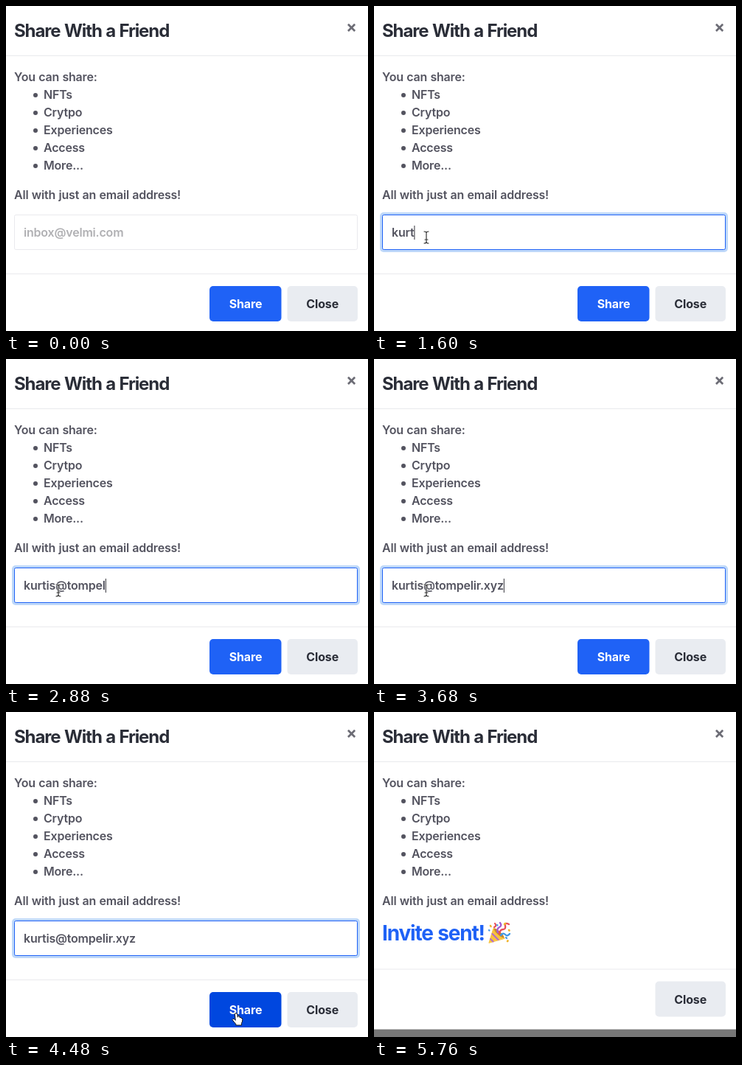
Write an HTML page that moves like this. It is 491 px wide and 441 px high and loops after 6.08 s.

```html
<!DOCTYPE html>
<html lang="en">
<head>
<meta charset="utf-8">
<title>Share dialog</title>
<style>
  html, body { margin: 0; width: 100%; height: 100%; overflow: hidden; background: #fff; }
  svg { display: block; width: 100%; height: 100%; }
  text {
    font: 600 16px Inter, "Liberation Sans", sans-serif;
    font-optical-sizing: none;
    letter-spacing: -0.0125em;
    word-spacing: 0.035em;
    fill: #53535f;
  }
  .title { font-size: 24px; font-weight: 700; letter-spacing: -0.046em; fill: #2a2d37; }
  .sent { font-size: 28px; font-weight: 700; letter-spacing: -0.042em; fill: #1f62f6; }
  .button { font-weight: 700; letter-spacing: -0.01em; text-anchor: middle; fill: #2a2d37; }
  .light { fill: #fff; }
  .hint { fill: #b0b0b3; }
  .rule { fill: #e9eaed; }
</style>
</head>
<body>
<svg viewBox="0 0 491 441">
  <rect width="491" height="441" fill="#fff"/>
  <text class="title" x="11" y="42">Share With a Friend</text>
  <path d="M464 24.8l9.2 9.2m0-9.2l-9.2 9.2" stroke="#6c6c75" stroke-width="2.7"/>
  <rect class="rule" y="67" width="491" height="1"/>
  <text x="11" y="102">You can share:</text>
  <g id="list"></g>
  <text x="11" y="262">All with just an email address!</text>

  <g id="form">
    <rect id="glow" x="8" y="280" width="472" height="54" rx="5" fill="#bed8f9"/>
    <rect id="field" x="11.5" y="283.5" width="465" height="47" rx="2" fill="#fff"/>
    <text id="hint" class="hint" x="24" y="313">inbox@velmi.com</text>
    <text id="typed" x="24" y="313"></text>
    <rect id="caret" y="298" width="1" height="19" fill="#33333a"/>
  </g>

  <g id="done">
    <text class="sent" x="11" y="310">Invite sent!</text>
    <g fill="none" stroke-linecap="round">
      <path d="M156 313L162 293.5Q172 297 177 307Z" fill="#f8c33c" stroke="#f8c33c" stroke-linejoin="round"/>
      <path d="M160.5 301l8 8M158 308l3.5 3.5" stroke="#b06ad0" stroke-width="2"/>
      <ellipse cx="169.5" cy="300" rx="2.4" ry="9" transform="rotate(-47 169.5 300)" fill="#c98a2c"/>
      <path d="M168 299q-2-5 2-7t1-6" stroke="#a65bd3" stroke-width="2.3"/>
      <path d="M170 301q1-6 5-6t3-5 5-2" stroke="#e8505b" stroke-width="2.4"/>
      <path d="M172 303q3-4 6-1t6-1" stroke="#3f97e6" stroke-width="2.3"/>
      <path d="M163 292q4-2 1-5" stroke="#e8505b" stroke-width="2.2"/>
      <path d="M177 288l1-1M158 290l.5 1M183 296l.5.5M181 311l.5-.5" stroke="#f0b52f" stroke-width="2.6"/>
      <path d="M179 306l1 1M167 289l.4.4M156 296l.4.4" stroke="#4a9be8" stroke-width="2.4"/>
    </g>
  </g>

  <g id="footer">
    <rect class="rule" y="363" width="491" height="1"/>
    <g id="share">
      <rect id="shareBox" x="276" y="380" width="97.5" height="48" rx="5"/>
      <text class="button light" x="325" y="410">Share</text>
    </g>
    <rect x="381.5" y="380" width="95.5" height="48" rx="5" fill="#e9ecf1"/>
    <text class="button" x="429.2" y="410">Close</text>
  </g>
  <rect id="backdrop" y="430.6" width="491" height="10.4" fill="#777"/>

  <g id="beam" fill="none" stroke-linecap="round">
    <path d="M-3-8q3 0 3 2v12q0 2-3 2M3-8q-3 0-3 2M3 8q-3 0-3-2M-2 3h4" stroke="#fff" stroke-width="2.6" opacity=".8"/>
    <path d="M-3-8q3 0 3 2v12q0 2-3 2M3-8q-3 0-3 2M3 8q-3 0-3-2M-2 3h4" stroke="#333" stroke-width="1.2"/>
  </g>
  <path id="arrow" d="M0 0V14.5L3.3 11.4L5.5 16.5L8 15.4L5.8 10.5H10.4Z" fill="#111" stroke="#fff"/>
  <path id="hand" d="M-1.6 1.2Q-1.6-.4 0-.4T1.7 1.2L2.4 5.2Q4-.2 5 5.6Q6.8 4.6 7 6.6Q9 6 8.8 8.4Q8.8 11.5 7.4 13.4V16H-.2V14.4Q-3 11.5-5 8.6Q-4.6 6.8-2.6 7.6L-.8 9.4Z" fill="#fff" stroke="#111" stroke-linejoin="round"/>
</svg>
<script>
const LOOP = 6080, STEP = 160;
const ADDRESS = "kurtis@tompelir.xyz";
const FOCUS = 800, SENT = 4640;

// Characters visible after each tick of typing
const TYPE_START = 1280;
const COUNTS = [1, 3, 4, 5, 6, 7, 8, 9, 10, 11, 13, 14, 16, 16, 18, 19];

// Time, pointer shape, x, y
const POINTER = [
  [0, "", 0, 0],
  [160, "beam", 84, 329],
  [320, "beam", 77, 322],
  [480, "beam", 73, 317],
  [640, "beam", 71, 314],
  [4000, "beam", 112, 327],
  [4160, "arrow", 226, 366],
  [4320, "hand", 305, 405],
  [4480, "hand", 312, 409],
  [4640, "arrow", 311, 409],
  [5600, "arrow", 311, 430],
  [5760, "", 0, 0]
];

const $ = id => document.getElementById(id);
const show = (id, on) => $(id).setAttribute("display", on ? "inline" : "none");
const set = (id, name, value) => $(id).setAttribute(name, value);

$("list").innerHTML = ["NFTs", "Crytpo", "Experiences", "Access", "More..."]
  .map((label, i) => `<circle cx="40" cy="${121 + i * 24}" r="3" fill="#53535f"/>` +
    `<text x="51" y="${126 + i * 24}">${label}</text>`)
  .join("");

function typedCount(t) {
  if (t < TYPE_START) return 0;
  const tick = Math.floor((t - TYPE_START) / STEP);
  return COUNTS[Math.min(tick, COUNTS.length - 1)];
}

function drawForm(t) {
  const count = typedCount(t);
  const focused = t >= FOCUS + STEP;
  show("glow", focused);
  set("field", "stroke", focused ? "#1f62f6" : t >= FOCUS ? "#ccd7f3" : "#e9e9ed");
  show("hint", !count);
  $("typed").textContent = ADDRESS.slice(0, count);
  show("caret", t >= FOCUS && t < 4320);
  set("caret", "x", 24 + (count ? $("typed").getComputedTextLength() : 0));
  set("shareBox", "fill", t >= 4320 ? "#0047df" : "#1f62f6");
}

function drawPointer(t) {
  const [, shape, x, y] = POINTER.filter(key => key[0] <= t).pop();
  for (const id of ["beam", "arrow", "hand"]) show(id, id === shape);
  if (shape) set(shape, "transform", `translate(${x} ${y})`);
}

function render(ms) {
  const t = Math.floor((ms % LOOP) / STEP) * STEP;
  const sent = t >= SENT;
  show("form", !sent);
  show("done", sent);
  show("share", !sent);
  show("backdrop", sent);
  set("footer", "transform", `translate(0 ${sent ? -14.5 : 0})`);
  drawForm(t);
  drawPointer(t);
}

const start = performance.now();
function loop() {
  render(performance.now() - start);
  requestAnimationFrame(loop);
}
loop();
</script>
</body>
</html>
```
